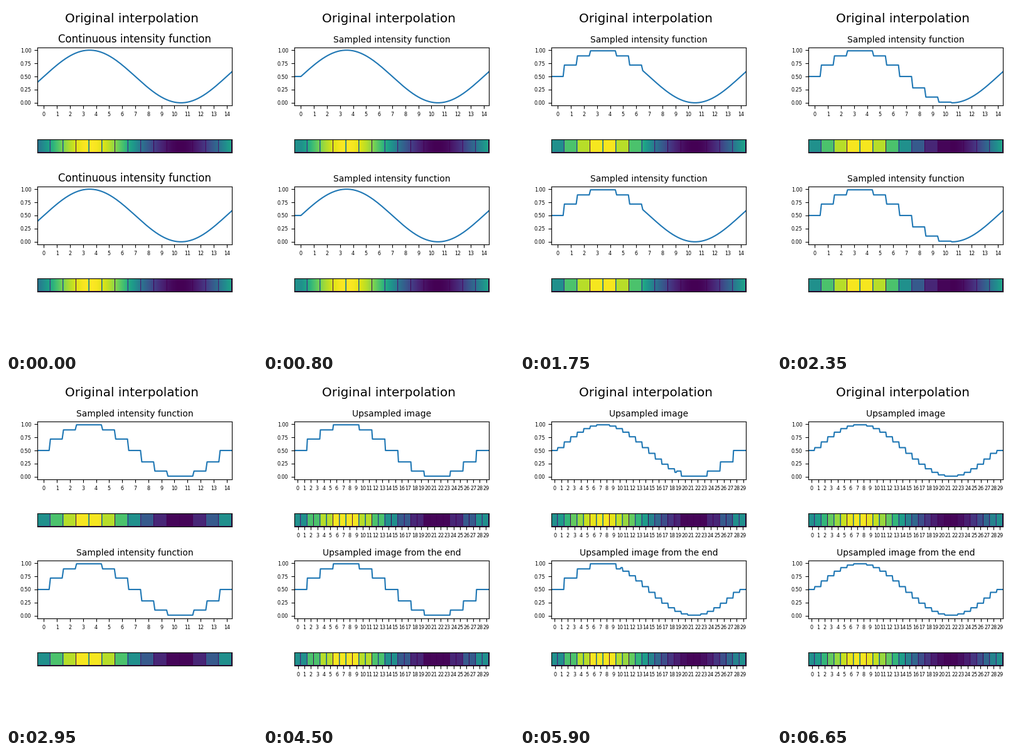
These frames come from a looping animation (400 px wide and 550 px high, 8 s). A matplotlib script:

```python
import numpy as np
import matplotlib.pyplot as plt
from matplotlib.animation import FuncAnimation

FRAMES, INTERVAL = 160, 50
SAMPLING_START, UPSAMPLING_START = 15, 90
SWEEP = 45            # frames one sweep takes
CELLS = 15
SUB = 10              # curve points per cell
IMG_W, IMG_H = 300, 20


def intensity(x):
    return 0.5 + 0.5 * np.sin(2 * np.pi * x / (CELLS - 1))


def positions(cells):
    return np.arange(cells * SUB) / SUB - 0.5


samples = intensity(np.arange(CELLS))
centers = np.arange(2 * CELLS) / 2 - 0.25
smooth = intensity(positions(CELLS))
sampled = np.repeat(samples, SUB)
doubled = np.repeat(samples, 2 * SUB)
linear = np.repeat(np.interp(centers, np.arange(CELLS), samples), SUB)


def strip(values):
    """Color strip with a dark line closing each cell and the bottom."""
    img = np.tile(np.repeat(values, IMG_W // len(values)), (IMG_H, 1))
    width = IMG_W * SUB // len(values)
    img[:, width - 1::width] = 0
    img[-1] = 0
    return img


class Panel:
    """A curve with its color strip below."""

    def __init__(self, fig, row, cells, strip_ticks):
        self.curve_ax = fig.add_subplot(4, 1, row)
        self.strip_ax = fig.add_subplot(4, 1, row + 1)
        x = positions(cells)
        self.line, = self.curve_ax.plot(x, np.zeros_like(x))
        self.curve_ax.set(xlim=(x[0], x[-1]), ylim=(-0.05, 1.05),
                          xticks=range(cells), yticks=np.linspace(0, 1, 5))
        self.image = self.strip_ax.imshow(np.zeros((IMG_H, IMG_W)),
                                          cmap="viridis", vmin=0, vmax=1)
        self.strip_ax.set(xticks=[], yticks=[])
        if strip_ticks:
            width = IMG_W // cells
            self.strip_ax.set_xticks(np.arange(cells) * width + width // 2,
                                     labels=range(cells))
        for ax in (self.curve_ax, self.strip_ax):
            ax.tick_params(labelsize="xx-small")

    def show(self, visible):
        self.curve_ax.set_visible(visible)
        self.strip_ax.set_visible(visible)

    def update(self, values, title, size):
        self.line.set_ydata(values)
        self.image.set_data(strip(values))
        self.curve_ax.set_title(title, fontsize=size)


fig = plt.figure(figsize=(4, 5.5), dpi=100)
fig.suptitle("Original interpolation", fontsize="x-large")
coarse = [Panel(fig, row, CELLS, False) for row in (1, 3)]
fine = [Panel(fig, row, 2 * CELLS, True) for row in (1, 3)]


def progress(frame, start, total):
    step = min(max(frame - start + 1, 0), SWEEP)
    return total * step // SWEEP


def update(frame):
    upsampling = frame >= UPSAMPLING_START
    for panel in coarse:
        panel.show(not upsampling)
    for panel in fine:
        panel.show(upsampling)

    if upsampling:
        total = len(doubled)
        done = progress(frame, UPSAMPLING_START, total)
        index = np.arange(total)
        fine[0].update(np.where(index < done, linear, doubled),
                       "Upsampled image", 10)
        fine[1].update(np.where(index >= total - done, linear, doubled),
                       "Upsampled image from the end", 10)
    else:
        done = progress(frame, SAMPLING_START, len(smooth))
        values = np.where(np.arange(len(smooth)) < done, sampled, smooth)
        title, size = (("Sampled intensity function", 10) if done
                       else ("Continuous intensity function", 12))
        for panel in coarse:
            panel.update(values, title, size)


anim = FuncAnimation(fig, update, frames=FRAMES, interval=INTERVAL,
                     init_func=lambda: update(0), repeat=True, repeat_delay=0)
plt.show()
```
